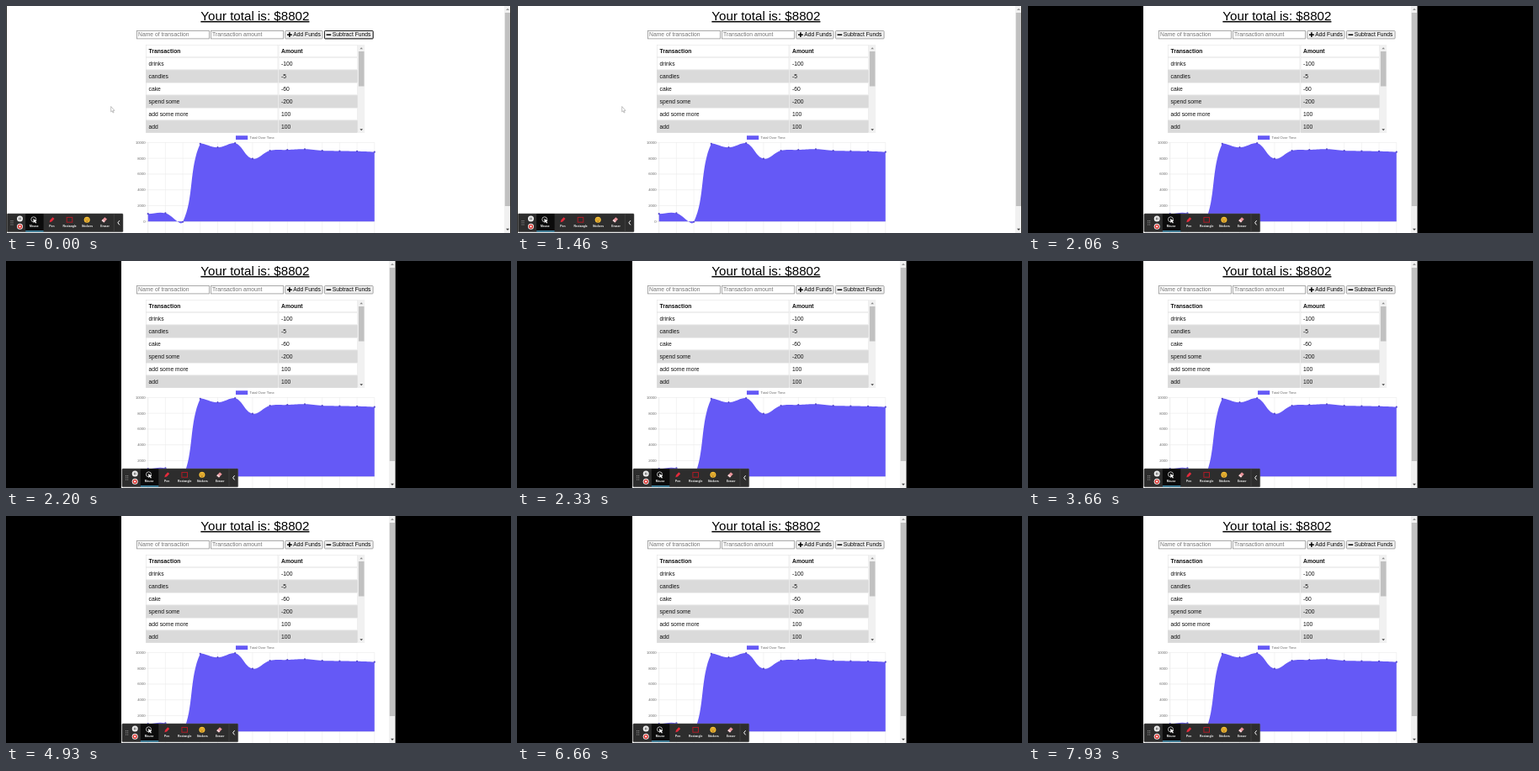
An HTML page for the animation above (8 s loop, 600 by 270 pixels).

```html
<!DOCTYPE html>
<html lang="en">
<head>
<meta charset="utf-8">
<title>Budget tracker</title>
<style>
  html, body { margin: 0; width: 100%; height: 100%; overflow: hidden; background: #fff; }
  svg { display: block; width: 600px; height: 270px; }
  text { font-family: "Liberation Sans", Arial, sans-serif; }
</style>
</head>
<body>
<svg id="stage" viewBox="0 0 600 270"></svg>
<script>
const LOOP = 8000, BLUR_AT = 460, NARROW_AT = 1600;
const BAR_SHIFT = 136.7, SCROLL_SHIFT = -137;
const PURPLE = '#6559f6';
const stage = document.getElementById('stage');

function add(parent, tag, attrs, content) {
  const node = document.createElementNS('http://www.w3.org/2000/svg', tag);
  for (const key in attrs) node.setAttribute(key, attrs[key]);
  if (content) node.textContent = content;
  parent.appendChild(node);
  return node;
}
const group = (parent = stage) => add(parent, 'g', {});
const rect = (g, x, y, width, height, fill, more) =>
  add(g, 'rect', { x, y, width, height, fill, ...more });
const path = (g, d, fill, more) => add(g, 'path', { d, fill, ...more });
const line = (g, d, stroke, width, more) =>
  path(g, d, 'none', { stroke, 'stroke-width': width, ...more });
const circle = (g, cx, cy, r, fill, more) => add(g, 'circle', { cx, cy, r, fill, ...more });
const label = (g, x, y, size, content, fill = '#111', more) =>
  add(g, 'text', { x, y, 'font-size': size, fill, ...more }, content);

const page = group();

function drawForm() {
  label(page, 295.9, 16.9, 15.15, 'Your total is: $8802', '#000',
    { 'text-anchor': 'middle', 'text-decoration': 'underline' });
  [[155.4, 'Name of transaction'], [243.4, 'Transaction amount']].forEach(([x, hint]) => {
    rect(page, x, 29.5, 86.2, 9.4, '#fff', { stroke: '#949494', 'stroke-width': .8 });
    label(page, x + 1.7, 36.4, 6.75, hint, '#757575');
  });
  [[331.7, 44.4, 341.2, 'Add Funds'], [378.5, 57.6, 387.7, 'Subtract Funds']].forEach(([x, w, tx, name]) => {
    rect(page, x, 29.5, w, 9.4, '#efefef', { stroke: '#949494', 'stroke-width': .8, rx: .8 });
    label(page, tx, 36.4, 6.75, name, '#000');
  });
  line(page, 'M334 34.2h5.8M336.9 31.3v5.8M380.6 34.2h5.6', '#000', 1.5);
}

function drawTable() {
  const rows = [['Transaction', 'Amount'], ['drinks', '-100'], ['candles', '-5'], ['cake', '-60'],
    ['spend some', '-200'], ['add some more', '100'], ['add', '100']];
  rows.forEach((cells, i) => {
    const y = 46.5 + 15 * i;
    const striped = i > 0 && i % 2 === 0;
    const height = i === 6 ? 14 : 14.2;
    [[166.4, 156.6], [324, 93.4]].forEach(([x, w], c) => {
      rect(page, x, y, w, height, striped ? '#dadada' : '#fff',
        { stroke: striped ? '#d6d6d6' : '#e4e4e4', 'stroke-width': .6 });
      label(page, x + 3.1, y + 9.7, 6.75, cells[c], '#111', { 'font-weight': i ? 400 : 700 });
    });
  });
  rect(page, 418, 46, 8.2, 105, '#f1f1f1');
  rect(page, 418.9, 54, 6.6, 41.5, '#c1c1c1');
  path(page, 'M420.4 51.2l1.8-2 1.8 2z', '#888');
  path(page, 'M420.4 146.2l1.8 2 1.8-2z', '#444');
}

// Cubic spline through the points, with handles scaled by neighbour distance.
function splinePath(points, top, bottom) {
  const clamp = y => Math.min(bottom, Math.max(top, y));
  const dist = (a, b) => Math.hypot(b[0] - a[0], b[1] - a[1]);
  const handles = points.map((p, i) => {
    const a = points[i - 1] || p, b = points[i + 1] || p;
    const before = dist(a, p), after = dist(p, b);
    const handle = k => [p[0] + k * (b[0] - a[0]), clamp(p[1] + k * (b[1] - a[1]))];
    const scale = .4 / (before + after);
    return { into: handle(-scale * before), out: handle(scale * after) };
  });
  return points.slice(1).reduce((d, p, i) =>
    d + `C${handles[i].out} ${handles[i + 1].into} ${p}`, `M${points[0]}`);
}

function drawChart() {
  const left = 168.7, top = 162.4, zero = 256.2, step = 20.7, right = left + 13 * step;
  const totals = [960, 1040, -60, 9850, 9380, 9930, 7950, 8970, 9070, 9160, 8970, 8920, 8890, 8802];
  const yOf = value => zero - value * (zero - top) / 10000;
  const points = totals.map((value, i) => [left + i * step, yOf(value)]);

  points.forEach(([x], i) => line(page, `M${x} ${top}V270`, i ? '#e8e8e8' : '#d8d8d8', .5));
  for (let value = 0; value <= 10000; value += 2000) {
    const y = yOf(value);
    line(page, `M${left - 3} ${y}H${right}`, value ? '#e5e5e5' : '#ccc', .5);
    label(page, 165.6, y + 1.5, 4.2, String(value), '#666', { 'text-anchor': 'end' });
  }
  rect(page, 273, 154.2, 14.2, 4.8, PURPLE);
  label(page, 289.6, 158.1, 4.2, 'Total Over Time', '#666');

  const curve = splinePath(points, top, 275);
  path(page, `${curve}V${zero}H${left}Z`, PURPLE);
  points.forEach(([x, y]) => circle(page, x, y, 1.1, '#5549cf'));
}

function drawScrollbar(g) {
  rect(g, 592, 0, 8, 270, '#f1f1f1');
  rect(g, 592.8, 8, 6.2, 230, '#c1c1c1');
  path(g, 'M594 5l2-2.2 2 2.2z', '#999');
  path(g, 'M594 264.8l2 2.2 2-2.2z', '#444');
}

function drawToolbar(g) {
  rect(g, 1.2, 247, 137.8, 21.8, '#2d2d2d', { stroke: '#555', 'stroke-width': .5, rx: 1 });
  for (let i = 0; i < 6; i++) circle(g, 6 + (i % 2) * 2, 255.6 + (i >> 1) * 2.2, .55, '#aaa');

  circle(g, 16.5, 253, 3.5, '#eee');
  line(g, 'M15.7 251.6v2.8M17.3 251.6v2.8', '#333', .7);
  circle(g, 16.5, 262.3, 3.5, '#eee');
  circle(g, 16.5, 262.3, 2.6, '#e03530');
  rect(g, 15.5, 261.3, 2, 2, '#fff');

  rect(g, 23.2, 247.3, 21.4, 21.2, '#0b0b0b');
  rect(g, 23.2, 267.3, 21.4, 1.2, '#55b9e6');
  ['Mouse', 'Pen', 'Rectangle', 'Stickers', 'Eraser'].forEach((name, i) =>
    label(g, 33.4 + i * 21.05, 263.1, 3.4, name, '#f4f4f4', { 'text-anchor': 'middle', 'font-weight': 700 }));

  circle(g, 32.8, 253.8, 3, 'none', { stroke: '#ddd', 'stroke-width': .8 });
  path(g, 'M32.4 253l.3 5 1.2-1.2 1.4 1.8 1-.8-1.4-1.7 1.8-.4z', '#fff');
  path(g, 'M51.7 257.3l.6-2.5 3.2-3.5 2 1.8-3.2 3.5z', '#e52b3c');
  rect(g, 72.2, 251.4, 6.6, 5.8, 'none', { stroke: '#b01c26', 'stroke-width': 1 });
  circle(g, 96.2, 254.2, 3.5, '#f4bd35');
  circle(g, 95, 253.3, .5, '#5c3510');
  circle(g, 97.4, 253.3, .5, '#5c3510');
  line(g, 'M94.5 255.2q1.7 2 3.4 0', '#7b4312', .7);
  path(g, 'M113.6 255.2l3.7-4 2.7 2.4-3.7 4z', '#e9949b');
  path(g, 'M113.6 255.2l1.3-1.4 2.7 2.4-1.3 1.4z', '#f3d5d7');

  line(g, 'M128.3 247.3v21.2', '#505050', .5);
  line(g, 'M134.9 255.2l-2 2.6 2 2.6', '#fff', 1);
}

drawForm();
drawTable();
drawChart();
const focusRing = rect(page, 378.5, 29.5, 57.7, 9.4, 'none', { stroke: '#222', 'stroke-width': 1, rx: .8 });
const scrollbar = group();
drawScrollbar(scrollbar);
const wideOnly = group();
rect(wideOnly, 0, 0, .9, 270, '#111');
rect(wideOnly, 599.1, 0, .9, 270, '#111');
path(wideOnly, 'M124.7 119.5v6.4l1.4-1.2 1 2.3 1-.4-1-2.2h1.9z', '#fff', { stroke: '#999', 'stroke-width': .6 });
const sidePanels = group();
rect(sidePanels, 0, 0, 137, 270, '#000');
rect(sidePanels, 462.6, 0, 138, 270, '#000');
const toolbar = group();
drawToolbar(toolbar);

const show = (node, on) => node.setAttribute('visibility', on ? 'visible' : 'hidden');
const shift = (node, x) => node.setAttribute('transform', `translate(${x} 0)`);

function render() {
  const time = performance.now() % LOOP;
  const narrow = time >= NARROW_AT;
  show(focusRing, time < BLUR_AT);
  show(wideOnly, !narrow);
  show(sidePanels, narrow);
  shift(scrollbar, narrow ? SCROLL_SHIFT : 0);
  shift(toolbar, narrow ? BAR_SHIFT : 0);
  requestAnimationFrame(render);
}
render();
</script>
</body>
</html>
```
